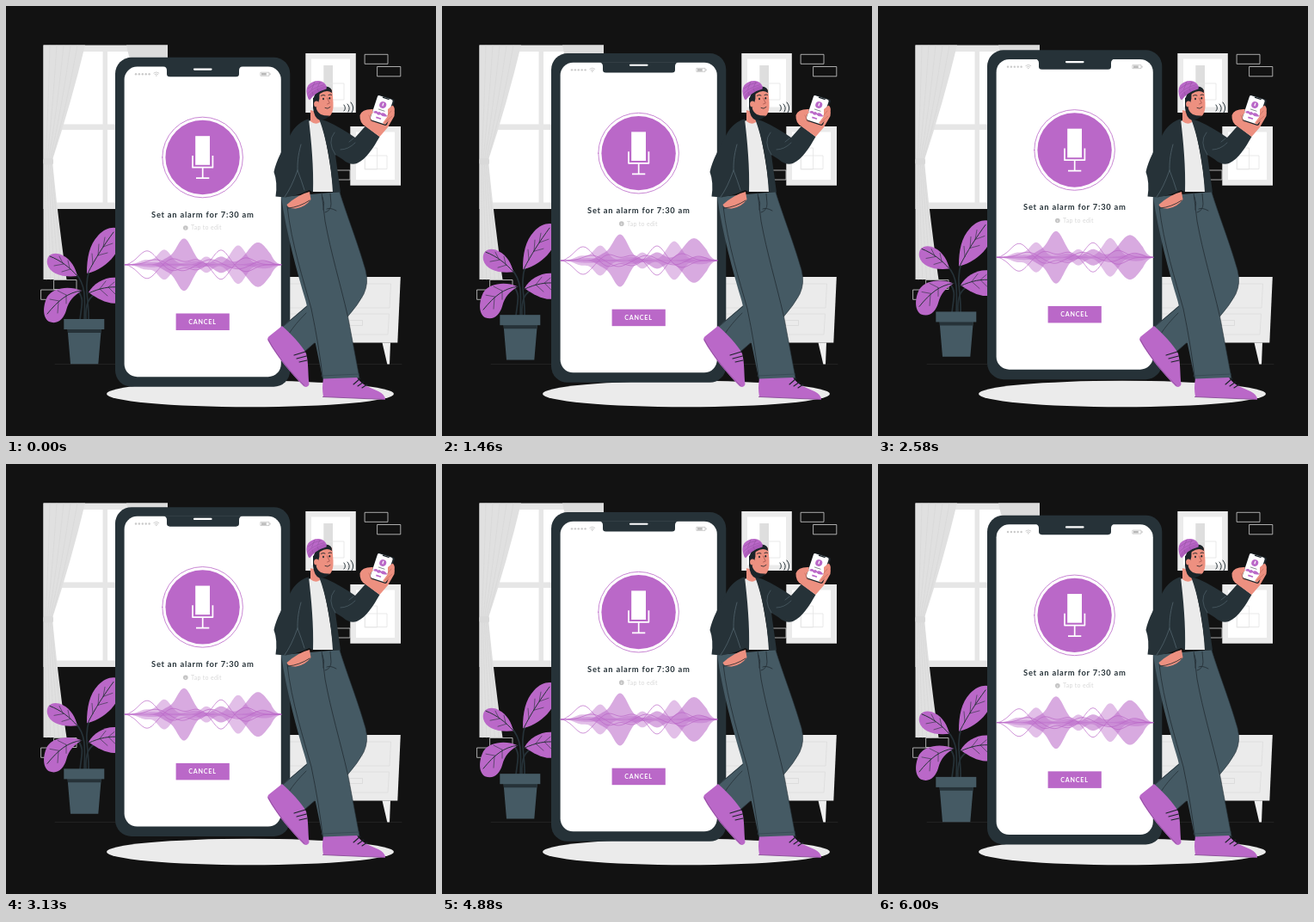
These frames come from a looping animation (500 by 500 pixels, 6.04 s). An HTML page with a canvas:

```html
<!DOCTYPE html>
<html lang="en">
<head>
<meta charset="utf-8">
<title>Voice assistant</title>
<style>
html, body { margin: 0; width: 100%; height: 100%; overflow: hidden; background: #121212; }
canvas { display: block; width: 500px; height: 500px; }
</style>
</head>
<body>
<canvas id="stage" width="500" height="500"></canvas>
<script>
const ctx = document.getElementById('stage').getContext('2d');
const LOOP = 6040, LIFT = 10;
const PURPLE = '#ba68c8', PLUM = '#8a4d97', DARK = '#263238', SLATE = '#455a64',
      PALE = '#ebebeb', GREY = '#dedede', SKIN = '#ed9080', INK = '#1b2429';

const cache = {};
function path(d) { return cache[d] || (cache[d] = new Path2D(d)); }
function fill(d, color) { ctx.fillStyle = color; ctx.fill(path(d)); }
function line(d, color, width = 0.8) {
  ctx.strokeStyle = color;
  ctx.lineWidth = width;
  ctx.stroke(path(d));
}
function rect(x, y, w, h, color) { ctx.fillStyle = color; ctx.fillRect(x, y, w, h); }
function frame(x, y, w, h, color, width = 0.8) {
  ctx.strokeStyle = color;
  ctx.lineWidth = width;
  ctx.strokeRect(x, y, w, h);
}
function round(x, y, w, h, r, color) {
  ctx.beginPath();
  ctx.roundRect(x, y, w, h, r);
  ctx.fillStyle = color;
  ctx.fill();
}
function disc(x, y, rx, color, ry = rx) {
  ctx.beginPath();
  ctx.ellipse(x, y, rx, ry, 0, 0, Math.PI * 2);
  ctx.fillStyle = color;
  ctx.fill();
}
function label(text, x, y, size, weight, spacing, color) {
  ctx.font = `${weight} ${size}px Lato, "Open Sans", sans-serif`;
  ctx.letterSpacing = spacing + 'px';
  ctx.textAlign = 'left';
  ctx.fillStyle = color;
  ctx.fillText(text, x, y);
}

function drawWindow() {
  rect(43.5, 45.5, 144.5, 190.5, '#e6e6e6');
  rect(52, 53, 60.5, 84.5, '#fff');
  rect(118, 53, 62, 84.5, '#fff');
  rect(52, 144, 60.5, 84.5, '#fff');
  rect(118, 144, 62, 84.5, '#fff');
  fill('M140 45.5H188V120C164 106 146 78 140 45.5Z', '#dcdcdc');
  fill('M43.5 45.5H92Q76 112 54 179C58 225 66 285 70.5 318H43.5Z', '#e0e0e0');
  for (let i = 0; i < 5; i++) {
    line(`M${51 + i * 8} 46Q${49 + i * 5} 125 ${46 + i * 1.7} 179`, '#d6d6d6', 0.6);
    line(`M${46 + i * 1.7} 184Q${46 + i * 3} 245 ${47 + i * 4.8} 318`, '#d6d6d6', 0.6);
  }
  round(43.5, 177, 11.5, 7.5, 2, '#d9d9d9');
}

function drawRoom() {
  drawWindow();
  line('M57 416.5H460', '#252525', 0.8);
  for (const [x, y, w, h] of [[417.5, 56.3, 26.5, 11], [432, 70.5, 26.8, 11.3],
                              [374, 191, 26, 11], [41, 330, 27, 11.3], [56, 318.5, 26, 11]])
    frame(x, y, w, h, '#d2d2d2', 0.8);

  rect(348.3, 55, 58.5, 69, PALE);
  rect(355, 61.5, 45, 56, '#fff');
  rect(369.3, 69, 10.7, 34, GREY);
  frame(362, 90, 31, 19, '#e4e4e4');
  rect(400.3, 140, 58.7, 68.7, PALE);
  rect(407, 146.5, 45, 55.5, '#fff');
  frame(417.5, 165, 14, 25, '#e4e4e4');
  frame(418, 174, 25, 15.5, '#e4e4e4');

  fill('M300 315H458.8L455.3 391.5H300Z', PALE);
  fill('M437.5 391.5H447L446 416.5H443.3Z', '#f0f0f0');
  line('M310 323H447.5L446 351H310ZM310 358H445.5L444 382H310Z', '#dadada', 0.7);
  line('M400 365.5H414.5V371.5H400ZM399 334H414.5V340H399Z', '#d6d6d6', 0.7);
  disc(284, 451, 167, PALE, 15.2);
}

function drawPlant() {
  line('M96 365C97 344 90 327 97 307', DARK, 1.7);
  line('M91 365C92 340 93 324 81 311', DARK, 1.7);
  line('M86 365C88 347 91 340 84 332', DARK, 1.7);
  line('M93 365C92 344 97 338 107 333', DARK, 1.7);
  fill('M94 311C94 292 97 278 107 267C116 257 129 255 134 262C137 280 121 305 94 311Z', PURPLE);
  fill('M83 314C67 316 51 312 48 300C46 288 57 285 66 290C76 295 81 305 83 314Z', PURPLE);
  fill('M88 331C74 325 55 327 48 338C43 348 42 362 50 367C60 371 67 364 70 354C73 342 79 337 88 331Z', PURPLE);
  fill('M96 333C102 322 116 314 130 316L137 322V343C123 350 109 342 96 333Z', PURPLE);
  line('M95 311C104 293 114 278 125 263', DARK, 1);
  line('M101 300L100 288M107 290L108 277M107 290L118 287M113 280L115 269M113 280L124 276', DARK, 0.6);
  line('M83 314C74 304 64 296 51 291', DARK, 1);
  line('M66 299L62 291M74 305L72 296M67 300L56 302M75 306L65 309', DARK, 0.6);
  line('M88 331C72 333 61 342 48 358', DARK, 1);
  line('M70 336L60 331M62 343L51 341M70 336L70 346M61 344L60 357', DARK, 0.6);
  line('M96 334C109 328 120 326 132 327', DARK, 1);
  line('M109 329L116 320M119 327L126 321M109 329L118 337M119 327L127 335', DARK, 0.6);
  fill('M71.5 375H110.8L107.3 416.3H75Z', SLATE);
  fill('M71.5 375.5H110.8L110.3 380H72Z', DARK);
  rect(67.3, 364, 47, 12, SLATE);
}

// Each bump is [center, height, spread].
function swell(x, bumps) {
  let h = 0;
  for (const [c, a, s] of bumps) h += a * Math.exp(-(((x - c) / s) ** 2));
  return h * Math.min(1, (x - 137.5) / 8, (320 - x) / 12);
}
function ribbon(bumps, alpha) {
  ctx.beginPath();
  for (let x = 138; x <= 320; x++) ctx.lineTo(x, 300.8 - swell(x, bumps) - 0.4);
  for (let x = 320; x >= 138; x--) ctx.lineTo(x, 300.8 + swell(x, bumps) + 0.4);
  ctx.globalAlpha = alpha;
  ctx.fillStyle = PURPLE;
  ctx.fill();
  ctx.globalAlpha = 1;
}
function thread(bumps, sign) {
  ctx.beginPath();
  for (let x = 138; x <= 320; x++) ctx.lineTo(x, 300.8 - sign * swell(x, bumps));
  ctx.strokeStyle = PURPLE;
  ctx.lineWidth = 0.7;
  ctx.stroke();
}
function drawWave() {
  ribbon([[184, 17, 11], [162, 5, 10], [233, 9, 9], [270, 22, 12]], 0.42);
  ribbon([[207, 30, 13], [186, 5, 9], [250, 9, 11], [293, 25.5, 17]], 0.56);
  ribbon([[170, 2.5, 18], [220, 4, 14], [300, 4, 16]], 0.4);
  const swing = [[164, 16, 14], [194, -7, 12], [221, -6, 12], [250, 17, 12], [279, -8, 13]];
  thread(swing, 1);
  thread(swing, -1);
  thread([[174, 6, 14], [205, -7, 14], [238, 6, 13], [270, -5, 14], [298, 5, 12]], 1);
}

function drawPhone() {
  round(127, 59.8, 203.3, 382.9, 19, DARK);
  round(137.6, 70.5, 182.2, 360.7, 15, '#fff');
  fill('M183 70H275Q271 70.8 271 75V79Q271 82.3 267.5 82.3H190.5Q187 82.3 187 79V75Q187 70.8 183 70Z', DARK);
  line('M219 73.6H238.5', '#fff', 2.2);
  for (let i = 0; i < 5; i++) disc(151 + i * 3.9, 79.2, 1.2, '#c9c9c9');
  line('M171.8 78Q174.8 75.6 177.8 78M173 79.6Q174.8 78 176.6 79.6', '#c9c9c9', 0.9);
  disc(174.8, 81, 0.8, '#c9c9c9');
  frame(296.3, 77.2, 9.7, 4, '#b8b8b8', 0.7);
  rect(297, 78, 5.8, 2.5, '#b8b8b8');
  rect(306.5, 78.3, 1, 1.8, '#b8b8b8');

  disc(228.6, 176, 43.2, PURPLE);
  line('M181.8 176A46.8 46.8 0 1 1 275.4 176A46.8 46.8 0 1 1 181.8 176Z', PURPLE, 0.8);
  rect(220.2, 151.2, 16.8, 33.6, '#fff');
  ctx.lineCap = 'butt';
  line('M217 174V187.7H240.4V174M228.7 187.7V200M221 200.2H236.3', '#fff', 1.7);
  ctx.lineCap = 'round';

  label('Set an alarm for 7:30 am', 169, 246, 9.4, 700, 0.75, DARK);
  disc(208.8, 258, 2.8, '#c4c4c4');
  line('M208.8 257.8V259.2', '#fff', 0.7);
  label('Tap to edit', 215, 260.4, 7, 400, 0.3, '#d8d8d8');
  drawWave();
  rect(197.6, 357.5, 62.2, 19.5, PURPLE);
  label('CANCEL', 212.3, 369.9, 7.2, 700, 0.75, '#fff');
}

function drawLegs() {
  fill('M356 343L320.5 373.5Q334 386 341 407.5L372 380L386 340Z', SLATE);
  line('M355 345L321 373.5Q334 386 341 407L362 389M349 357Q336 370 329 381', DARK, 0.8);
  fill('M321 372C331 381 343 393 349 404C352 415 351 428 352.5 440Q351 444.5 346 442C332 428 315 408 304.5 389Q303.5 386 306 384Z', PURPLE);
  line('M305 388C315 407 332 427 347 441.5', PLUM, 0.8);
  line('M335 406L348 402M338 410L349.5 407M341 414L350 412', INK, 1.1);

  fill('M320 222L388 216C395 240 409 275 418 307Q422 322 416 335Q409 348 397.5 361L411 432.5L368.5 434.5C362 402 356 373 348.5 343C338 308 326 264 320 222Z', SLATE);
  line('M327 233C332 277 346 319 355 352Q364 395 368.5 434', DARK, 0.9);
  line('M388 217C395 240 409 275 418 307Q422 322 416 335Q409 348 397.5 361L411 432.5', DARK, 0.6);
  line('M367 217L371 250C378 288 388 320 397.5 361M377 218L378 230Q378 238 371 240M368 222Q371 229 369 237M384 238Q377 234 373 236', DARK, 0.9);
  line('M367 430L410.5 428', '#34464f', 0.7);

  fill('M369 433.5L408 432C414 441 424 444 433 448Q441 452 441 457.5L369 454.5Q367 443 369 433.5Z', PURPLE);
  line('M368.5 454.5L440.5 457.5', PLUM, 0.9);
  line('M404 440L412 433M409 442L416 437M414 444L420 440', INK, 1.1);
}

function drawTorso() {
  fill('M350 134L365 131Q374 157 381 216H356Z', PALE);
  fill('M354 121L367 125L367 133Q361 140 354 134Z', SKIN);
  fill('M326.5 231Q340 219 353 216L354.5 225Q348 234 337 235.5Q328 236 326.5 231Z', SKIN);
  line('M328 235Q341 234 353 226', INK, 0.8);

  fill('M352 131.5C344 133 335 141 331 149C323 164 314 180 311.5 193Q316 205 313.5 221.5L325 222.5Q341 220 352.5 214L357 216.5C358 188 355 157 352 131.5Z', DARK);
  fill('M364 131L373 134C384 139 396 146 406 153L418 139.5L434.5 152C427 165 419 178 408 183Q400 186 391 178L383 173L389 216.5H380Q377 166 364 131Z', DARK);
  line('M343 161C339 175 339 184 339 191Q344 204 347 214M339 191Q332 211 324 222', '#60757f', 0.6);
  line('M382 147Q373 158 383 173M404 154L399 158M389 167Q398 167 406 159', '#60757f', 0.5);
}

function drawHead() {
  fill('M360 104Q364 96 379 97Q380 104 380.5 112Q381 122 377.5 127Q371 132 361 129L357 118Z', SKIN);
  fill('M357 118L360.5 117Q361 123 366 126Q371 128 376 127.5Q372 133 364.5 132.5Q358 130 357 118Z', INK);
  fill('M357 107L364.5 101Q365 108 363 113L361 118H357Z', INK);
  disc(361, 114, 2.9, SKIN, 3.6);
  fill('M358 106Q360 97 372 93.5Q379.5 94 379 101Q373 96.5 365 102Q360 107 358 106Z', INK);
  fill('M352 109Q347 98 351.5 92Q357 86.5 364 87Q371 88 373 94Q360 98 352 109Z', PURPLE);
  fill('M351 106Q355 97 371 92.5Q373.5 94 372.5 96.5Q360 100 353 109.5Z', '#ad5cbb');
  line('M350.5 102Q357 95 370 91.5M351 96Q358 90 366 89M356 100L357.5 104M362 96L363.5 99.5M359 88L355.5 97M365 88.5L362.5 94', PLUM, 0.45);
  disc(369, 108, 0.9, INK, 1.3);
  disc(376.3, 107.3, 0.9, INK, 1.3);
  line('M366.5 104.2Q369 102.6 371 104M375 103.5Q377 102.3 378.5 103.3', INK, 0.9);
  line('M373.5 107L376.3 113L373.5 114', '#9d4e48', 0.7);
  line('M371 118.5Q374 120.5 377 117.5', INK, 0.8);
}

function drawHand() {
  fill('M411.5 127Q414 120 425 120L440 119L448 113Q453 119 451.5 128L444 141L434.5 152L418 140Q411 136 411.5 127Z', SKIN);
  ctx.save();
  ctx.translate(437.3, 121);
  ctx.rotate(0.32);
  round(-10.2, -16, 21, 32, 2.5, INK);
  round(-10, -15, 18.6, 29.8, 2, '#fff');
  rect(-4, -15, 8, 1.4, INK);
  disc(-1, -6, 4, PURPLE);
  rect(-1.6, -8.3, 1.2, 3.6, '#fff');
  line('M-4 0.3H3', DARK, 0.5);
  fill('M-9 5Q-6 2 -4 4Q-2 1.5 0 4Q3 1 8 5Q3 8 0 5.5Q-3 8 -5 5.5Q-7 7 -9 5Z', PURPLE);
  rect(-4, 9.3, 6, 1.7, PURPLE);
  ctx.restore();
  fill('M444 120L449.5 115.5Q453 118 451 123L446 132L441 138L438 136L444 128Z', SKIN);
  fill('M412 128Q414 120 425 121L427 124L422 127L425 136L420 141Z', SKIN);
  line('M443 128L448 122M441 135L449 128M422 127L426 135', '#b9675b', 0.6);
  line('M393 115Q396 119 393 122M397 114Q401 118 398 123M401 112Q406 118 402 124', DARK, 1);
}

function draw(now) {
  const phase = (now % LOOP) / LOOP;
  const lift = LIFT * (1 - Math.abs(2 * phase - 1));
  ctx.lineCap = ctx.lineJoin = 'round';
  rect(0, 0, 500, 500, '#121212');
  drawRoom();
  ctx.save();
  ctx.translate(0, -lift);
  drawPlant();
  drawPhone();
  ctx.restore();
  drawLegs();
  drawTorso();
  drawHead();
  drawHand();
}

const start = performance.now();
function tick() {
  draw(performance.now() - start);
  requestAnimationFrame(tick);
}
tick();
</script>
</body>
</html>
```
